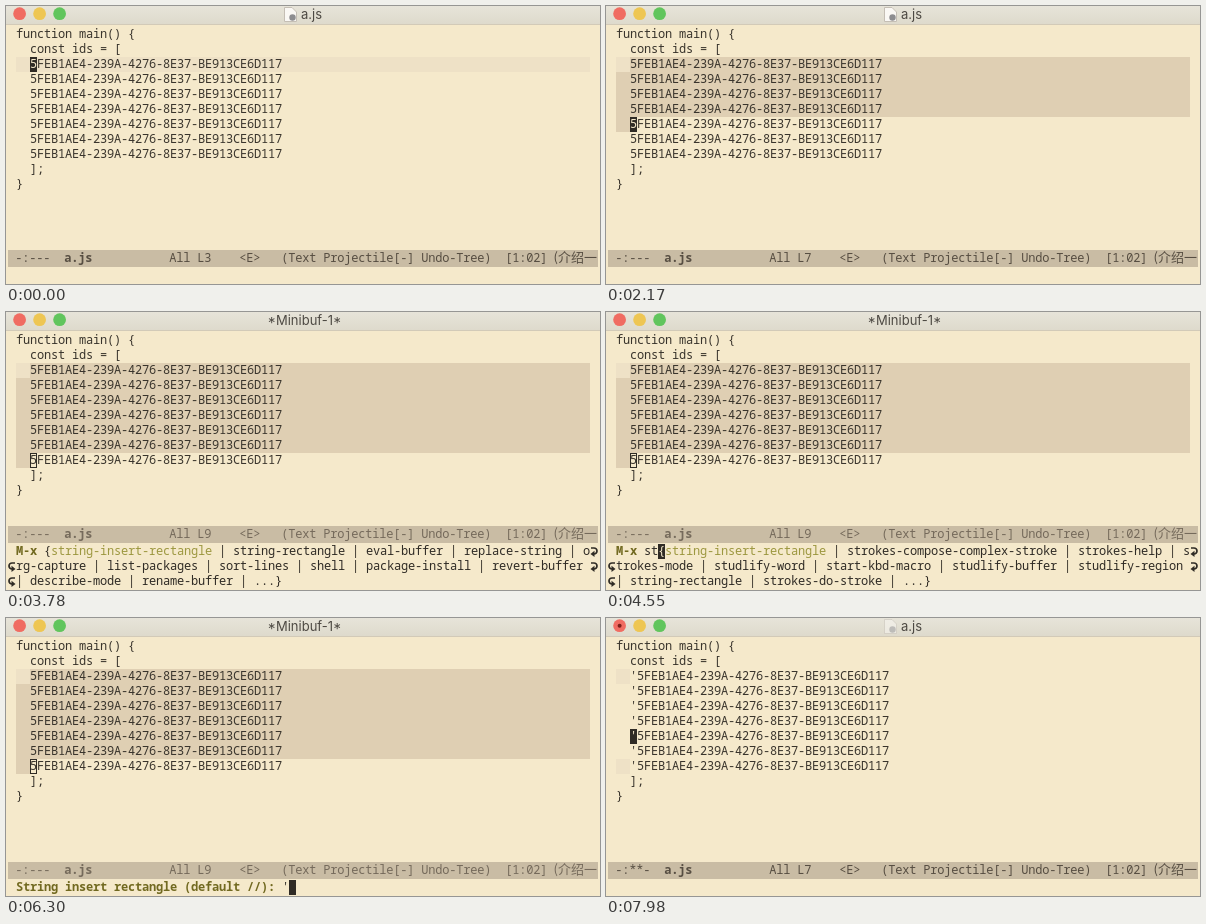
Recreate the animation shown at these times as an HTML page with a canvas. Size 594 by 278 pixels, loop 8 s.

```html
<!DOCTYPE html>
<html lang="en">
<head>
<meta charset="utf-8">
<title>Rectangle insert</title>
<style>
  html, body { margin: 0; width: 100%; height: 100%; overflow: hidden; background: #f5e9cb; }
  canvas { display: block; width: 594px; height: 278px; }
</style>
</head>
<body>
<canvas id="stage"></canvas>
<script>
const W = 594, H = 278, LOOP = 8000;
const CW = 7, LH = 15, LEFT = 10, TOP = 21, COLS = 82;
const MONO = '"Noto Sans Mono", "DejaVu Sans Mono", monospace';
const C = {
  bg: '#f5e9cb', text: '#39342c', dark: '#2f2b25', region: '#dfcfb3', band: '#eee1c6',
  mode: '#c9bca4', modeText: '#574e42', modeDim: '#756a5b', olive: '#9c973f', prompt: '#716920'
};
const ID = '5FEB1AE4-239A-4276-8E37-BE913CE6D117';

// Each track is a list of [time, value]; the value holds until the next one.
const LINE = [[0, 3], [1400, 4], [1680, 5], [1890, 6], [2100, 7], [2310, 8], [2450, 9], [7700, 8], [7910, 7]];
const CURSOR = [[0, 1], [700, 0], [910, 1], [2940, 0], [3220, 1], [3710, 0], [4200, 1],
  [6020, 0], [6300, 1], [7490, 0], [7700, 1]];
const MINI = [[0, ''], [910, 'mark'], [1400, ''], [3220, 'mx'], [5460, 'ask'], [6720, '']];
const TYPED = [[0, 0], [4200, 1], [4480, 2], [4690, 3], [4830, 4], [4970, 5], [5180, 6]];
const QUOTED = 6720;

const FIRST = 'string-insert-rectangle';
const LISTS = [
  'string-rectangle | eval-buffer | replace-string | org-capture | list-packages | sort-lines | shell | package-install | revert-buffer | describe-mode | rename-buffer | ...}',
  'strokes-compose-complex-stroke | strokes-help | strokes-mode | studlify-word | start-kbd-macro | studlify-buffer | studlify-region | string-rectangle | strokes-do-stroke | ...}',
  'string-rectangle | replace-string | bibtex-String | js2r-split-string | org-capture-string | isearch-edit-string | calc-display-strings | helm-cr-empty-string | info-xref-docstrings | ...}'
];

const canvas = document.getElementById('stage');
const g = canvas.getContext('2d');
const dpr = window.devicePixelRatio || 1;
canvas.width = W * dpr;
canvas.height = H * dpr;

function at(track, t) {
  let value = track[0][1];
  for (const [start, v] of track) if (t >= start) value = v;
  return value;
}

function rect(x, y, w, h, color) {
  g.fillStyle = color;
  g.fillRect(x, y, w, h);
}

function disc(x, y, r, color) {
  g.fillStyle = color;
  g.beginPath();
  g.arc(x, y, r, 0, Math.PI * 2);
  g.fill();
}

// Terminal text: one glyph centred in each cell.
function mono(str, x, base, color = C.text, weight = 500) {
  g.font = `${weight} 12px ${MONO}`;
  g.fillStyle = color;
  g.textAlign = 'center';
  [...str].forEach((ch, i) => {
    if (ch !== ' ') g.fillText(ch, x + (i + 0.5) * CW, base);
  });
  g.textAlign = 'left';
}

const colX = col => LEFT + col * CW;
const rowY = row => TOP + row * LH;

function block(x, y, ch) {
  rect(x, y, CW, LH, C.dark);
  mono(ch, x, y + 11, C.bg);
}

function titleBar(mini, edited) {
  const grad = g.createLinearGradient(0, 0, 0, 18);
  grad.addColorStop(0, '#e7e4d9');
  grad.addColorStop(1, '#dedacc');
  rect(0, 0, W, 18, grad);
  rect(0, 18, W, 1, '#d2cab8');
  ['#f06c62', '#eec653', '#61c55d'].forEach((c, i) => disc(13.6 + 20 * i, 7.7, 6.4, c));
  if (edited) disc(13.6, 7.7, 2, '#7c1f1a');

  g.font = '13px Inter, "Open Sans", sans-serif';
  g.fillStyle = '#4d4943';
  if (mini) {
    g.textAlign = 'center';
    g.fillText('*Minibuf-1*', 298.5, 13);
    g.textAlign = 'left';
    return;
  }
  g.fillText('a.js', 295, 13);
  g.globalAlpha = edited ? 0.5 : 1;
  g.beginPath();
  g.moveTo(278.5, 1.5);
  g.lineTo(286, 1.5);
  g.lineTo(290.5, 6);
  g.lineTo(290.5, 15.5);
  g.lineTo(278.5, 15.5);
  g.closePath();
  g.fillStyle = '#faf8f4';
  g.fill();
  g.lineWidth = 1;
  g.strokeStyle = '#c4beb4';
  g.stroke();
  disc(286.5, 11.5, 3.2, '#8d8d90');
  g.globalAlpha = 1;
}

function region(line) {
  const last = line - 1;
  for (let row = 2; row < last; row++) {
    const x = row === 2 ? colX(2) : LEFT;
    rect(x, rowY(row), 584 - x, LH, C.region);
  }
  if (last > 2) rect(LEFT, rowY(last), 2 * CW, LH, C.region);
}

function buffer(t, line, cursorOn, mini) {
  const quoted = t >= QUOTED;
  const id = (quoted ? "'" : '') + ID;
  rect(LEFT, rowY(2), t < 1400 ? 574 : 2 * CW, LH, C.band);
  if (quoted) rect(LEFT, rowY(8), 2 * CW, LH, C.band);
  else region(line);
  const lines = ['function main() {', '  const ids = [', ...Array(7).fill('  ' + id), '  ];', '}'];
  lines.forEach((s, row) => mono(s, LEFT, rowY(row) + 11));

  const x = colX(2), y = rowY(line - 1);
  if (mini) {
    g.strokeStyle = C.dark;
    g.lineWidth = 1;
    g.strokeRect(x + 0.5, y + 0.5, CW - 1, LH - 1);
  } else if (cursorOn) {
    block(x, y, id[0]);
  }
}

function modeLine(y, line, edited, mini) {
  const color = mini ? C.modeDim : C.modeText;
  const base = y + 12, x = 9.4;
  rect(2, y, 590, 17, C.mode);
  g.save();
  g.beginPath();
  g.rect(2, y, 590, 17);
  g.clip();
  mono(edited ? '-:**-' : '-:---', x, base, color);
  mono('a.js', x + 7 * CW, base, color, 700);
  mono(`All L${line}    <E>   (Text Projectile[-] Undo-Tree)  [1:02]`, x + 22 * CW, base, color);
  g.font = '13px "Noto Sans CJK SC", "Noto Sans CJK", sans-serif';
  g.fillText('(介绍一', 547.5, base);
  g.restore();
}

// Fringe mark for a wrapped line; dir 1 is the right edge, -1 the left.
function wrapMark(x, y, dir) {
  g.save();
  g.translate(x, y);
  g.scale(dir, 1);
  g.strokeStyle = C.dark;
  g.lineWidth = 1.7;
  g.beginPath();
  g.moveTo(-3, -3);
  g.lineTo(0, -3);
  g.arc(0, 0, 3, -Math.PI / 2, Math.PI / 2);
  g.stroke();
  g.fillStyle = C.dark;
  g.beginPath();
  g.moveTo(-3.5, 3);
  g.lineTo(0.5, -0.2);
  g.lineTo(0.5, 6);
  g.fill();
  g.restore();
}

function commandPrompt(t, cursorOn) {
  const y = 232;
  const typed = 'string'.slice(0, at(TYPED, t));
  const head = 'M-x ' + typed;
  const list = LISTS[Math.max(0, Math.min(2, typed.length - 1))];
  const full = `${head}{${FIRST} | ${list}`;
  const start = head.length + 1, end = start + FIRST.length;

  mono('M-x', LEFT, y + 11, C.prompt, 700);
  mono(typed, colX(4), y + 11, C.dark);
  if (cursorOn) block(colX(head.length), y, '{');
  else mono('{', colX(head.length), y + 11, C.dark);
  mono(FIRST, colX(start), y + 11, C.olive);
  mono(full.slice(end, COLS), colX(end), y + 11, C.dark);
  for (let row = 1; row * COLS < full.length; row++) {
    const top = y + row * LH;
    mono(full.slice(row * COLS, (row + 1) * COLS), LEFT, top + 11, C.dark);
    wrapMark(588, top - 8, 1);
    wrapMark(6, top + 7, -1);
  }
}

function stringPrompt(t, cursorOn) {
  const prompt = 'String insert rectangle (default //): ';
  const input = t >= 6300 ? "'" : '';
  mono(prompt, LEFT, 273, C.prompt, 700);
  mono(input, colX(prompt.length), 273, C.dark);
  if (cursorOn) rect(colX(prompt.length + input.length), 262, CW, LH, C.dark);
}

function draw(t) {
  const line = at(LINE, t), cursorOn = at(CURSOR, t), state = at(MINI, t);
  const mini = state === 'mx' || state === 'ask';
  const edited = t >= QUOTED;
  g.setTransform(dpr, 0, 0, dpr, 0, 0);
  rect(0, 0, W, H, C.bg);
  titleBar(mini, edited);
  buffer(t, line, cursorOn, mini);
  modeLine(state === 'mx' ? 214 : 244, line, edited, mini);
  if (state === 'mark') mono('Mark activated', LEFT, 273);
  if (state === 'mx') commandPrompt(t, cursorOn);
  if (state === 'ask') stringPrompt(t, cursorOn);
}

const t0 = performance.now();
function tick() {
  draw((performance.now() - t0) % LOOP);
  requestAnimationFrame(tick);
}
tick();
</script>
</body>
</html>
```
